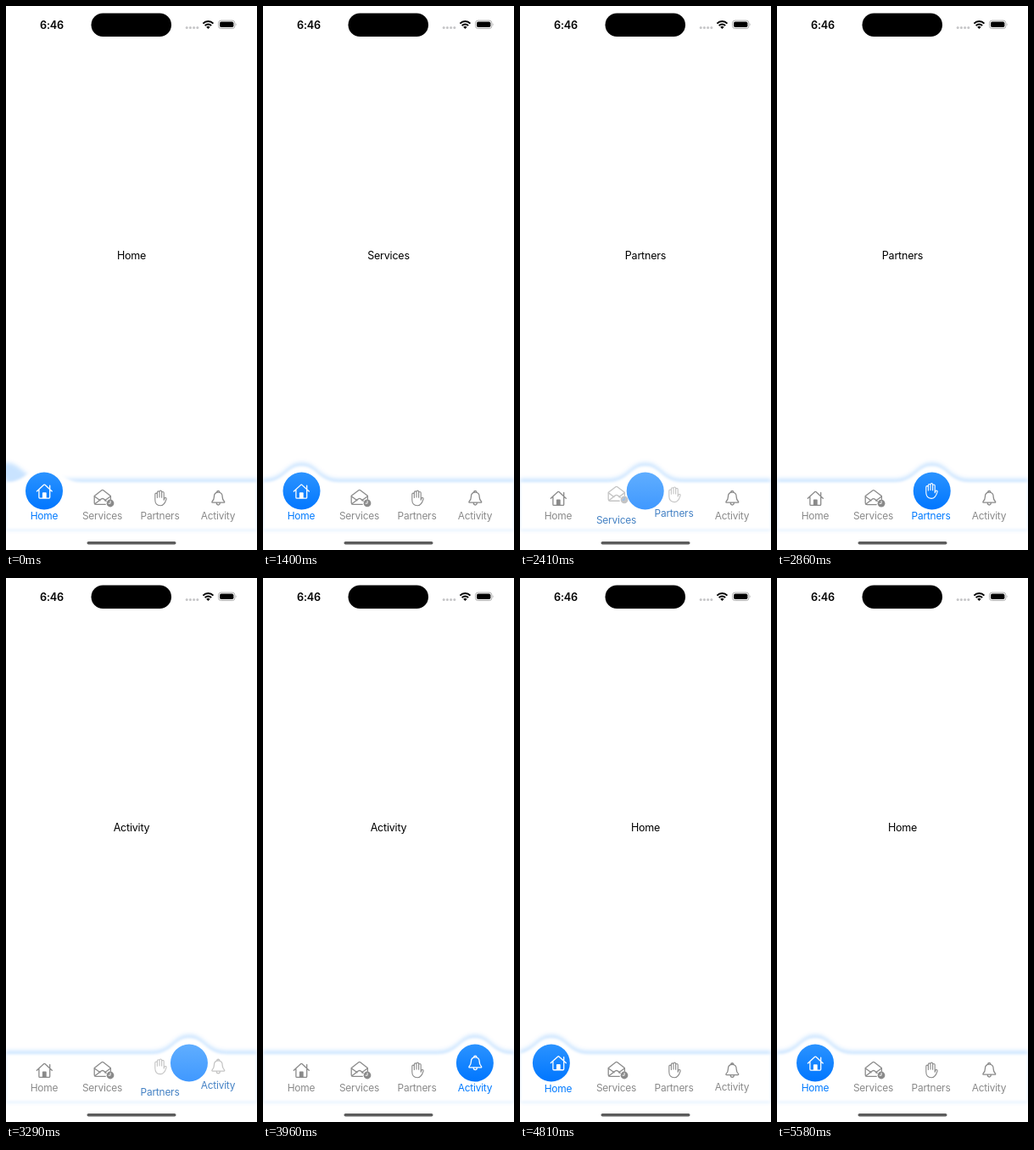
Recreate the animation shown at these times as an HTML page. Size 296x640 px, loop 5660 ms.

```html
<!DOCTYPE html>
<html lang="en">
<head>
<meta charset="utf-8">
<title>Tab bar</title>
<style>
  html, body { margin: 0; width: 100%; height: 100%; overflow: hidden; background: #fff; }
  svg { display: block; width: 296px; height: 640px; }
  text { font-family: Inter, Roboto, sans-serif; letter-spacing: -.2px; text-anchor: middle; }
  .icon { fill: none; stroke: currentColor; stroke-width: 1.3; stroke-linecap: round; stroke-linejoin: round; }
  .solid { fill: currentColor; stroke: none; }
</style>
</head>
<body>
<svg viewBox="0 0 296 640">
  <defs>
    <linearGradient id="tint" x1="0" y1="0" x2="0" y2="1">
      <stop offset="0" stop-color="#2b93ff"/>
      <stop offset="1" stop-color="#0076ff"/>
    </linearGradient>
    <filter id="soft" filterUnits="userSpaceOnUse" x="-60" y="510" width="420" height="130">
      <feGaussianBlur stdDeviation="1.5"/>
    </filter>
    <filter id="glow" filterUnits="userSpaceOnUse" x="-60" y="510" width="420" height="130">
      <feGaussianBlur stdDeviation="2.8"/>
    </filter>
  </defs>
  <rect width="296" height="640" fill="#fff"/>

  <text x="54" y="26.6" font-size="12.7" font-weight="600">6:46</text>
  <rect x="100.5" y="8.5" width="94.5" height="27.5" rx="13.75"/>
  <g fill="#c6c6c8">
    <circle cx="213.2" cy="25.4" r="1.5"/><circle cx="217.4" cy="25.4" r="1.5"/>
    <circle cx="221.6" cy="25.4" r="1.5"/><circle cx="225.8" cy="25.4" r="1.5"/>
  </g>
  <g fill="none" stroke="#000" stroke-width="2">
    <path d="M232.4 20.6a8.2 8.2 0 0 1 12 0"/>
    <path d="M234.7 23.1a5 5 0 0 1 7.4 0"/>
  </g>
  <path d="M236.2 24.7a3.2 3.2 0 0 1 4.4 0L238.4 27z"/>
  <rect x="250.5" y="17.1" width="19.4" height="9.4" rx="3" fill="none" stroke="#a5a5a5" stroke-width=".9"/>
  <rect x="252" y="18.6" width="16.4" height="6.4" rx="1.8"/>
  <path d="M270.9 20.1q1.5 1.7 0 3.4z" fill="#a5a5a5"/>

  <text id="title" x="148" y="297.6" font-size="12.5"></text>

  <path id="shadow" fill="#007aff" fill-opacity=".21" filter="url(#glow)"/>
  <path id="bar" fill="#fff" filter="url(#soft)"/>
  <circle id="dot" cy="570.5" r="22" fill="url(#tint)"/>
  <g id="tabs"></g>
  <rect x="95.5" y="630" width="105" height="3.6" rx="1.8" fill="#5c5c5c"/>
</svg>
<script>
const LOOP = 5660;
const BASE = 560;
const GRAY = [138, 138, 138], BLUE = [0, 122, 255], WHITE = [255, 255, 255];

const tabs = [
  { name: 'Home', x: 45, art: `
    <path d="M-9 .2L-.6 -7.4q.6 -.5 1.2 0L9 .2M-6.4 -1.6V7.4q0 1 1 1H5.4q1 0 1 -1V-1.6M6.4 -2.6V-6.6"/>
    <path class="solid" d="M-2.4 8.4V2.4q0 -.8 .8 -.8H1.6q.8 0 .8 .8V8.4z"/>` },
  { name: 'Services', x: 113.5, art: `
    <path d="M3.4 7.4H-7.6a2 2 0 0 1 -2 -2V-2.6L-1 -9.2q1 -.7 2 0L9.6 -2.6V1.2"/>
    <path d="M-9.3 -2L-2.8 2.8M9.3 -2L2.8 2.8M-9 6.8L-1.5 1q1.5 -1 3 0L4.4 3.4"/>
    <circle class="solid" cx="9.2" cy="6" r="4.4"/>
    <path class="hands" stroke-width=".9" d="M9.3 3.4V6.2H7.2"/>` },
  { name: 'Partners', x: 181.5, art: `
    <path stroke-width="1.1" d="M-6 -.2V-4.6a1.3 1.3 0 0 1 2.6 0V-.6V-6.8a1.3 1.3 0 0 1 2.6 0V-1V-7.6
      a1.3 1.3 0 0 1 2.6 0V-.8V-6.2a1.3 1.3 0 0 1 2.6 0V2.2L5.3 -.2a1.2 1.2 0 0 1 2 1.2
      C6 5.6 4.6 8.8 .2 8.8C-4 8.8 -6 6 -6 2z"/>` },
  { name: 'Activity', x: 250, art: `
    <path d="M-6.6 5.2q-1.2 0 -.6 -1.2Q-4.9 1.6 -4.9 -1.6C-4.9 -5 -3 -6.9 0 -6.9S4.9 -5 4.9 -1.6
      Q4.9 1.6 7.2 4q.6 1.2 -.6 1.2zM-1.6 -7a1.6 1.6 0 0 1 3.2 0M-2 5.6a2 2.4 0 0 0 4 0"/>` }
];

// Taps: start time and the tab chosen
const taps = [[-2000, 0], [1388, 1], [2262, 2], [3150, 3], [4435, 0]];

const $ = id => document.getElementById(id);
const clamp = v => Math.min(1, Math.max(0, v));
const lerp = (a, b, p) => a + (b - a) * p;
const mix = (a, b, p) => `rgb(${a.map((v, i) => Math.round(lerp(v, b[i], p)))})`;

$('tabs').innerHTML = tabs.map(tab =>
  `<g><g class="icon">${tab.art}</g><text x="${tab.x}" font-size="11.9">${tab.name}</text></g>`).join('');
tabs.forEach((tab, i) => {
  const g = $('tabs').children[i];
  tab.icon = g.querySelector('.icon');
  tab.label = g.querySelector('text');
  tab.hands = g.querySelector('.hands');
});

// Spring with response 0.6 s and damping 0.7
function spring(s) {
  const w = 2 * Math.PI / .6, z = .7, d = w * Math.sqrt(1 - z * z);
  return 1 - Math.exp(-z * w * s) * (Math.cos(d * s) + z * w / d * Math.sin(d * s));
}

function barPath(m, dy = 0) {
  const y = BASE + dy, top = y - 19;
  return `M0 ${y}H${m - 45}C${m - 19} ${y} ${m - 19} ${top} ${m} ${top}` +
    `C${m + 19} ${top} ${m + 19} ${y} ${m + 45} ${y}H296V616H0z`;
}

// The picture advances about nine times a second
function step(t) {
  if (t < 1400) return 0;
  const [from, gap] = t < 4180 ? [1400, 111] : [4180, 105];
  return from + Math.floor((t - from) / gap) * gap;
}

function draw(time) {
  const t = step(time);
  const n = taps.findLastIndex(tap => tap[0] <= t);
  const [start, to] = taps[n];
  const from = n ? taps[n - 1][1] : to;
  const p = spring((t - start) / 1000), q = clamp(p);
  const mid = lerp(tabs[from].x, tabs[to].x, p);

  $('title').textContent = tabs[to].name;
  $('bar').setAttribute('d', barPath(mid));
  // Before the first tap the shadow still sits at the left edge
  $('shadow').setAttribute('d', barPath(n ? mid : 0, -3.8));
  $('dot').setAttribute('cx', mid);
  $('dot').setAttribute('opacity', 1 - q * (1 - q));

  tabs.forEach((tab, i) => {
    const on = i === to ? p : i === from ? 1 - p : 0;
    const a = clamp(on);
    const moving = n ? p * (1 - p) : 0;
    const shift = i === to ? -14 * moving : i === from ? 20 * moving : 0;
    tab.icon.setAttribute('transform', `translate(${tab.x + .3} ${lerp(579, 570.7, on)})`);
    tab.icon.style.color = mix(GRAY, WHITE, a);
    tab.label.setAttribute('y', 604.2 + shift);
    tab.label.style.fill = mix(GRAY, BLUE, a);
    if (tab.hands) tab.hands.style.stroke = mix(WHITE, BLUE, a);
  });
}

const origin = performance.now();
function tick() {
  draw((performance.now() - origin) % LOOP);
  requestAnimationFrame(tick);
}
tick();
</script>
</body>
</html>
```
